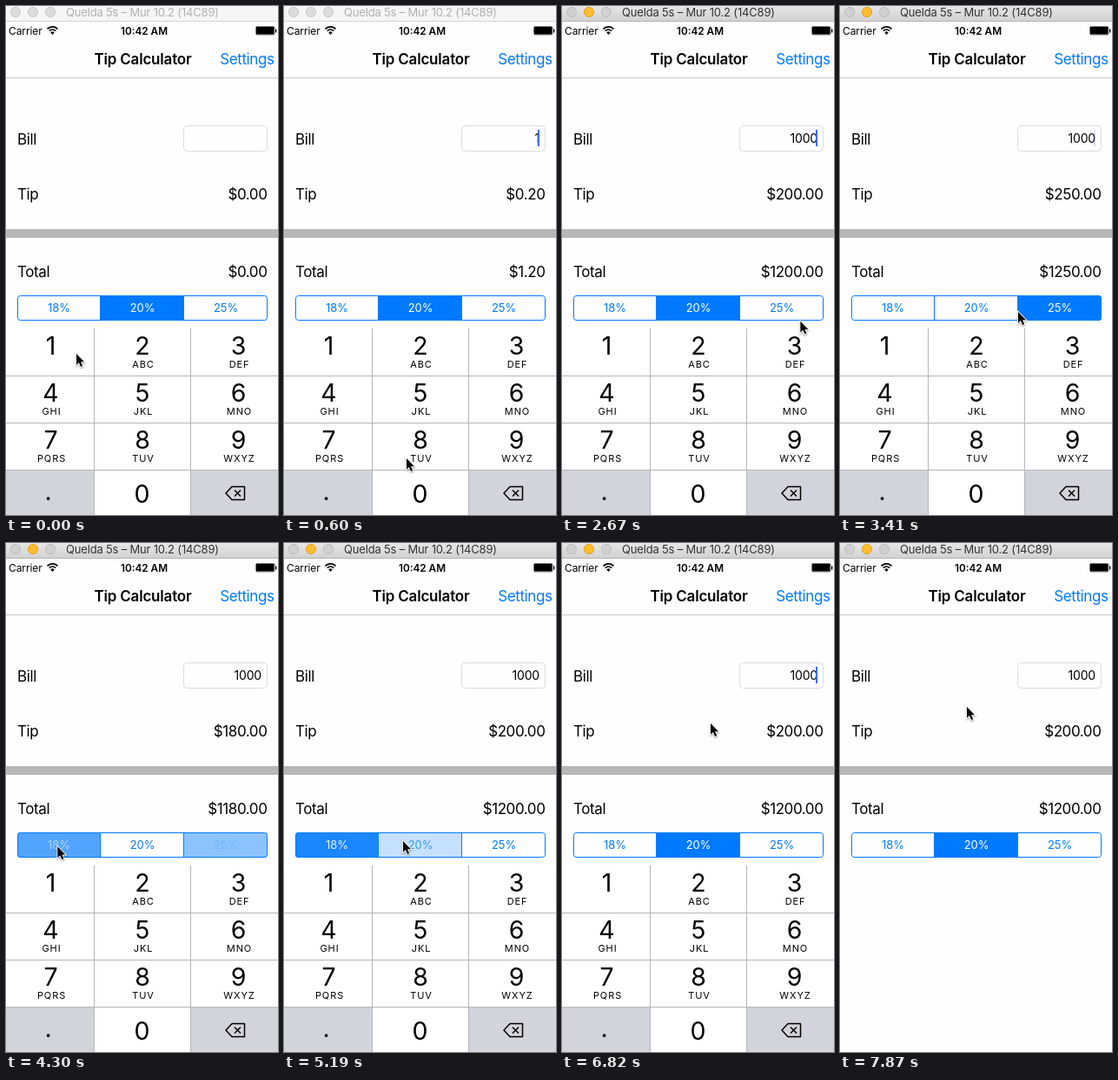
An HTML page with a canvas that plays this animation: 313x584 px, repeating every 8 s.

```html
<!DOCTYPE html>
<html lang="en">
<head>
<meta charset="utf-8">
<title>Tip Calculator</title>
<style>
html, body { margin: 0; width: 100%; height: 100%; overflow: hidden; background: #fff; }
canvas { display: block; width: 313px; height: 584px; }
</style>
</head>
<body>
<canvas id="stage"></canvas>
<script>
const W = 313, H = 584, LOOP = 8000;
const TICK = 148.2; // the screen refreshes once per tick; all times below are in ticks
const BLUE = '#007aff', FONT = 'Inter, Roboto, sans-serif';
const canvas = document.getElementById('stage');
const ctx = canvas.getContext('2d');
const dpr = window.devicePixelRatio || 1;
canvas.width = W * dpr;
canvas.height = H * dpr;

const taps = [[1, '1'], [6, '0'], [8, '0'], [9, '0']];
const picks = [[-9, 1], [20, 2], [28, 0], [35, 1]];
const rates = [18, 20, 25];
const ACTIVE = 8, DISMISS = 52;

// Pointer stops: [tick, x, y]
const stops = [[2, 81, 399], [4, 141, 519], [5, 152, 557], [11, 152, 557], [16, 299, 385],
  [19, 262, 350], [22, 243, 351], [23, 205, 351], [27, 58, 347], [30, 60, 349],
  [34, 137, 342], [42, 137, 342], [46, 171, 207], [50, 146, 188]];

const clamp = v => Math.min(1, Math.max(0, v));

function pointerAt(k) {
  const i = stops.findIndex(s => s[0] > k);
  if (i < 1) return stops.at(i).slice(1);
  const [k0, x0, y0] = stops[i - 1], [k1, x1, y1] = stops[i];
  const p = (k - k0) / (k1 - k0);
  return [x0 + (x1 - x0) * p, y0 + (y1 - y0) * p];
}

function caretAlpha(k) {
  if (k < 1 || k >= DISMISS) return 0;
  if (k <= 10) return clamp(k / 2);
  const phase = (k + 3.2) % 6.5;
  return clamp(Math.min(phase, 4.7 - phase));
}

// Selected index and the fill of each segment during the cross-fade
function selection(k) {
  const n = picks.filter(s => s[0] <= k).length - 1;
  const [since, index] = picks[n];
  const p = clamp(.22 + .45 * (k - since));
  const fills = [0, 0, 0];
  if (n > 0) fills[picks[n - 1][1]] = 1 - p ** 1.5;
  fills[index] = p;
  return { index, fills };
}

function text(s, x, y, size, { align = 'left', color = '#000', weight = 400, track = 0 } = {}) {
  ctx.font = `${weight} ${size}px ${FONT}`;
  ctx.letterSpacing = track + 'px';
  ctx.textAlign = align;
  ctx.fillStyle = color;
  ctx.fillText(s, x, y);
}

function rect(x, y, w, h, color) {
  ctx.fillStyle = color;
  ctx.fillRect(x, y, w, h);
}

function frame(x, y, w, h, r, color) {
  ctx.beginPath();
  ctx.roundRect(x, y, w, h, r);
  ctx.strokeStyle = color;
  ctx.lineWidth = 1;
  ctx.stroke();
}

function poly(points) {
  ctx.beginPath();
  points.forEach(([x, y]) => ctx.lineTo(x, y));
  ctx.closePath();
}

function drawTitleBar(active) {
  const g = ctx.createLinearGradient(0, 0, 0, 17);
  g.addColorStop(0, active ? '#e6e6e6' : '#f6f6f6');
  g.addColorStop(1, active ? '#d2d2d2' : '#f6f6f6');
  rect(0, 0, W, 17, g);
  rect(0, 17, W, 1, active ? '#b4b4b4' : '#d4d4d4');
  for (let i = 0; i < 3; i++) {
    const lit = active && i === 1;
    ctx.beginPath();
    ctx.arc(11 + 20 * i, 7, 5.6, 0, 7);
    ctx.fillStyle = lit ? '#fdbd2f' : active ? '#d0d0d0' : '#dcdcdc';
    ctx.fill();
    ctx.strokeStyle = lit ? '#e0a32a' : active ? '#bdbdbd' : '#cbcbcb';
    ctx.lineWidth = 1;
    ctx.stroke();
  }
  text('Quelda 5s – Mur 10.2 (14C89)', 69, 12, 13, { color: active ? '#333' : '#b0b0b0', track: -.18 });
}

function drawStatus() {
  text('Carrier', 3, 32.5, 12, { track: -.1 });
  text('10:42 AM', 159, 32.5, 11.8, { align: 'center', weight: 600 });
  ctx.strokeStyle = '#000';
  ctx.lineWidth = 1.7;
  for (const r of [5, 8.2]) {
    ctx.beginPath();
    ctx.arc(53.5, 32, r, -Math.PI * .76, -Math.PI * .24);
    ctx.stroke();
  }
  ctx.beginPath();
  ctx.moveTo(53.5, 33);
  ctx.arc(53.5, 32.5, 3, -Math.PI * .76, -Math.PI * .24);
  ctx.fillStyle = '#000';
  ctx.fill();
  frame(287.5, 23.5, 21.5, 9.5, 1.5, '#777');
  rect(288, 24, 20.5, 8.5, '#000');
  rect(310, 26.5, 1.3, 4, '#000');
}

function drawForm(k) {
  const bill = taps.filter(s => s[0] < k).map(s => s[1]).join('');
  const tip = bill * rates[selection(k).index] / 100;
  const body = { track: -.41 }, right = { align: 'right', track: -.41 };

  text('Tip Calculator', 157.5, 66.5, 17, { align: 'center', weight: 600, track: -.2 });
  text('Settings', 308.5, 66.5, 17, { ...right, color: BLUE });
  rect(0, 82, W, 1, '#c8c8c8');

  text('Bill', 13, 159, 17, body);
  frame(204.5, 137.5, 96, 29, 4, '#dcdcdc');
  text(bill, 294, 157, 14, { align: 'right', track: -.15 });
  ctx.globalAlpha = caretAlpha(k);
  rect(292, 142, 2, 19, '#426bf2');
  ctx.globalAlpha = 1;

  text('Tip', 13, 222, 17, body);
  text('$' + tip.toFixed(2), 300.5, 222, 17, right);
  rect(0, 256, W, 10, '#b7b7b7');
  text('Total', 13, 311, 17, body);
  text('$' + (+bill + tip).toFixed(2), 300.5, 311, 17, right);
}

function drawSegments(k) {
  ctx.save();
  ctx.beginPath();
  ctx.roundRect(13, 332, 288, 29, 3.5);
  ctx.clip();
  selection(k).fills.forEach((a, i) => {
    const x = 12.5 + 96 * i;
    rect(x, 332, 96.5, 29, `rgba(0,122,255,${a})`);
    rect(x - .5, 332, 1, 29, BLUE);
    text(rates[i] + '%', x + 48.5, 351, 13,
      { align: 'center', color: `rgb(${255 * a},${122 + 133 * a},255)`, track: -.08 });
  });
  ctx.restore();
  frame(13.5, 332.5, 287, 28, 3, BLUE);
}

function drawBackspace() {
  ctx.strokeStyle = '#000';
  ctx.lineWidth = 1.5;
  ctx.lineJoin = 'round';
  poly([[253, 559], [260, 551.5], [274.5, 551.5], [274.5, 566.5], [260, 566.5]]);
  ctx.stroke();
  ctx.beginPath();
  for (const s of [-1, 1]) {
    ctx.moveTo(266.5 - 3.5 * s, 555.5);
    ctx.lineTo(266.5 + 3.5 * s, 562.5);
  }
  ctx.stroke();
}

function drawKeyboard(k) {
  const dark = '#d1d4db', line = '#b4b6ba', big = { align: 'center' };
  const letters = ['', 'ABC', 'DEF', 'GHI', 'JKL', 'MNO', 'PQRS', 'TUV', 'WXYZ'];
  const down = taps.find(s => s[0] === k)?.[1];
  ctx.save();
  ctx.translate(0, 214 * clamp((k - DISMISS + 1) / 2));
  rect(0, 370, W, 214, '#fff');
  rect(0, 532, 101, 52, dark);
  rect(213, 532, 100, 52, dark);
  if (down === '1') rect(0, 370, 101, 54, dark);
  if (down === '0') rect(102, 532, 110, 52, dark);
  for (const y of [424, 478, 532]) rect(0, y, W, 1, line);
  for (const x of [101, 212]) rect(x, 370, 1, 214, line);
  letters.forEach((s, i) => {
    const x = [51.5, 157, 267.5][i % 3], y = 400 + 54 * Math.floor(i / 3);
    text(String(i + 1), x, y, 28.5, big);
    text(s, x + 1, y + 15, 11, { align: 'center', track: .9 });
  });
  text('0', 156.5, 569.5, 28.5, big);
  text('.', 48.5, 567, 28.5, big);
  drawBackspace();
  ctx.restore();
}

function drawPointer(k) {
  ctx.save();
  ctx.translate(...pointerAt(k));
  ctx.scale(.9, .9);
  poly([[0, 0], [0, 14.2], [3.2, 11.2], [5.7, 16.6], [8, 15.6], [5.6, 10.3], [10, 10.3]]);
  ctx.shadowColor = 'rgba(0,0,0,.4)';
  ctx.shadowBlur = 2 * dpr;
  ctx.shadowOffsetY = dpr;
  ctx.strokeStyle = '#fff';
  ctx.lineJoin = 'miter';
  ctx.lineWidth = 2;
  ctx.stroke();
  ctx.shadowColor = 'transparent';
  ctx.fillStyle = '#000';
  ctx.fill();
  ctx.restore();
}

function draw(now) {
  const k = Math.floor(now % LOOP / TICK);
  ctx.setTransform(dpr, 0, 0, dpr, 0, 0);
  rect(0, 0, W, H, '#fefefe');
  drawTitleBar(k >= ACTIVE);
  drawStatus();
  drawForm(k);
  drawSegments(k);
  drawKeyboard(k);
  drawPointer(k);
}

const start = performance.now();
function loop() {
  draw(performance.now() - start);
  requestAnimationFrame(loop);
}
loop();
</script>
</body>
</html>
```
